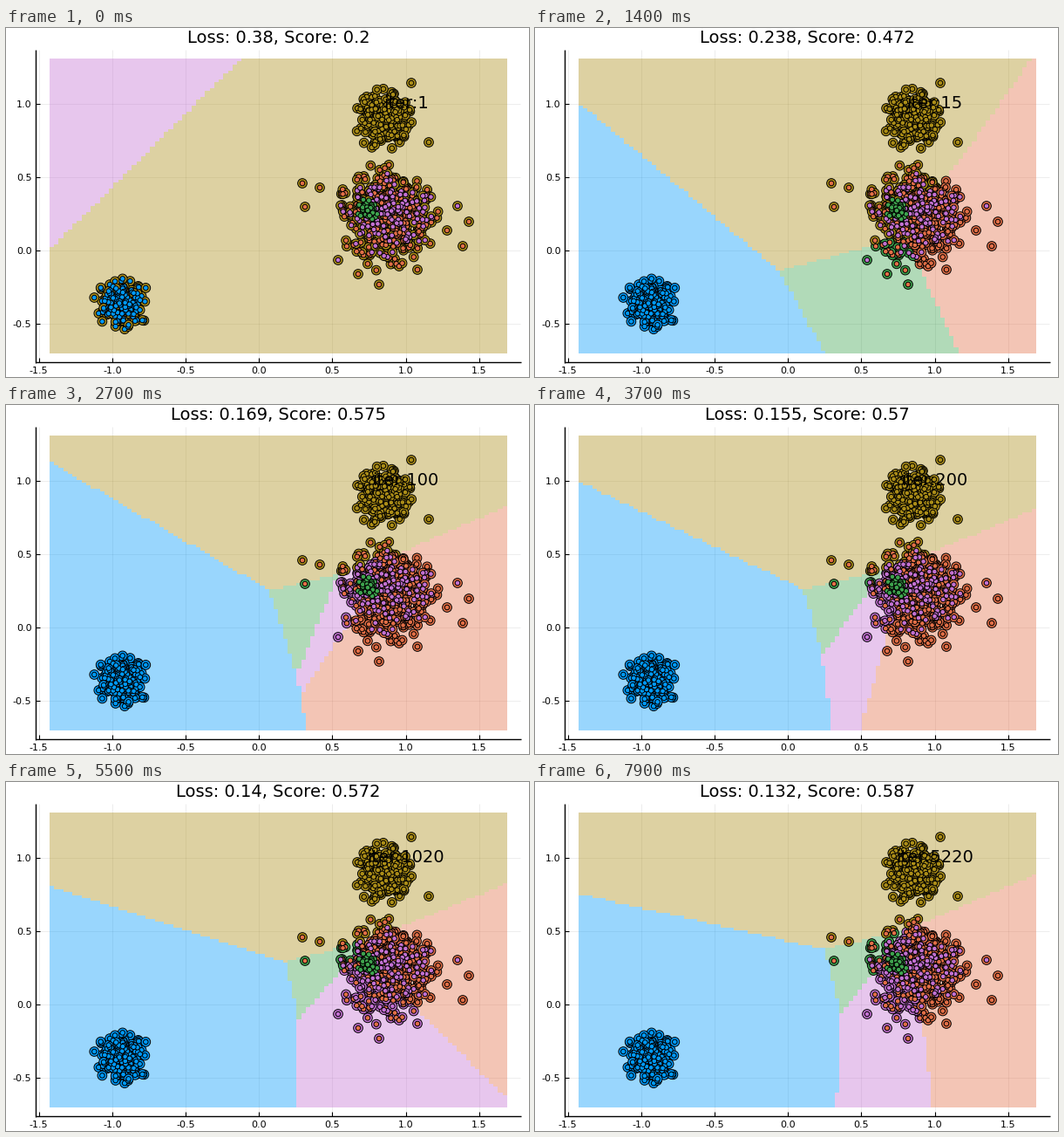
A matplotlib script for the animation above (8 s loop, 600 px wide and 400 px high).

```python
import numpy as np
import matplotlib.pyplot as plt
from matplotlib.animation import FuncAnimation

FRAMES, INTERVAL = 80, 100
plt.rcParams["font.family"] = "DejaVu Sans"

BLUE, ORANGE, GREEN, PURPLE, GOLD = range(5)
PALETTE = np.array([(0, 154, 250), (227, 111, 71), (62, 164, 78),
                    (195, 113, 210), (172, 142, 24)]) / 255
LEFT, RIGHT, TOP, BOTTOM = 50, 575, 35, 373
ORIGIN = np.array([290.2, 255])
UNIT = np.array([168.4, -168.2])
GRID = 100

# Linear classifier at a few stages of training: (bias, x, y) for
# blue, orange, green and purple; gold always scores zero.
STAGES = [0, 8, 14, 27, 46, 64, 79]
WEIGHTS = np.array([
    [(-3, -1.2, -1), (-2.5, 1.2, -.25), (-1.2, .26, -.93), (-1.43, -1, 1)],
    [(-1.293, -2.37, -3), (-1.638, 1.4, -.255), (-.784, .263, -.93), (-.895, -.281, 1)],
    [(-.378, -1.68, -2), (-.654, .888, -.628), (-.112, .244, -.926), (-.4, .5, -.8)],
    [(.354, -.701, -1.2), (.09, .459, -1.047), (.214, .216, -.91), (.175, .316, -.951)],
    [(.326, -.371, -1), (.1124, .3847, -.96), (.1985, .2107, -.867), (.148, .351, -1)],
    [(.371, -.273, -1), (.1427, .4287, -1.0155), (.2284, .227, -.873), (.165, .407, -1.031)],
    [(.432, -.226, -1), (.1715, .433, -1.023), (.28, .217, -.894), (.2075, .393, -1.028)],
])
LOSS = [0.38, 0.263, 0.238, 0.169, 0.143, 0.136, 0.132]
SCORE = [0.2, 0.405, 0.472, 0.575, 0.566, 0.578, 0.587]


def weights_at(step):
    hi = max(1, int(np.searchsorted(STAGES, step)))
    start, end = STAGES[hi - 1], STAGES[hi]
    mix = (step - start) / (end - start)
    return (1 - mix) * WEIGHTS[hi - 1] + mix * WEIGHTS[hi]


def classify(pixels, step):
    xy = (pixels - ORIGIN) / UNIT
    features = np.column_stack([np.ones(len(xy)), xy])
    scores = features @ weights_at(step).T
    return np.column_stack([scores, np.zeros(len(xy))]).argmax(axis=1)


def iteration(step):
    if step < 20:
        return step + 1
    if step < 40:
        return 20 + 10 * (step - 19)
    if step < 60:
        return 220 + 50 * (step - 39)
    return 1220 + 200 * (step - 59)


def stat(values, step):
    return f"{np.interp(step, STAGES, values):.3f}".rstrip("0")


rng = np.random.default_rng(7)


def cluster(count, center, spread, reach=2.2, strays=()):
    offsets = rng.normal(size=(count * 2, 2))
    offsets = offsets[np.hypot(*offsets.T) < reach][:count]
    points = np.array(center) + offsets * spread
    return np.vstack([points, np.reshape(strays, (-1, 2))])


samples = {
    BLUE: cluster(180, (134, 316), (13, 13), 2.6),
    ORANGE: cluster(270, (437, 217), (29, 30), 2.1, strays=[
        (340, 178), (360, 183), (343, 205), (531, 222), (524, 250),
        (506, 232), (428, 294), (404, 282), (472, 277)]),
    PURPLE: cluster(140, (435, 213), (25, 22), 2.3, strays=[(518, 204), (381, 266)]),
    GREEN: cluster(60, (414, 209), (6, 6)),
    GOLD: cluster(160, (433, 106), (16, 18), 2.1, strays=[(465, 63), (485, 131)]),
}
points = np.vstack(list(samples.values()))
truth = np.repeat(list(samples), [len(p) for p in samples.values()])

centers = (np.arange(GRID) + 0.5) / GRID
cells = np.stack(np.meshgrid(LEFT + centers * (RIGHT - LEFT),
                             TOP + centers * (BOTTOM - TOP)), -1).reshape(-1, 2)

fig = plt.figure(figsize=(6, 4), dpi=100, facecolor="white")
ax = fig.add_axes([0, 0, 1, 1])
ax.axis("off")
regions = ax.imshow(np.ones((GRID, GRID, 3)), extent=(LEFT, RIGHT, BOTTOM, TOP),
                    interpolation="nearest", alpha=0.4, aspect="auto", zorder=2)
ax.set(xlim=(0, 600), ylim=(400, 0))


def line(xs, ys, **style):
    ax.plot(xs, ys, color="black", solid_capstyle="butt", **style)


def label(x, y, text="", size=14, ha="center"):
    return ax.text(x, y, text, fontsize=size, ha=ha, va="baseline", zorder=6)


for value in np.arange(-1.5, 1.6, 0.5):
    x = ORIGIN[0] + UNIT[0] * value
    line([x, x], [25, 383], lw=0.5, alpha=0.1, zorder=1)
    line([x, x], [378, 383], lw=0.8, zorder=3)
    label(x, 396.5, f"{value:.1f}", size=8)
for value in np.arange(-0.5, 1.1, 0.5):
    y = ORIGIN[1] + UNIT[1] * value
    line([34, 590], [y, y], lw=0.5, alpha=0.1, zorder=1)
    line([34, 39], [y, y], lw=0.8, zorder=3)
    label(29.5, y + 4, f"{value:.1f}", size=8, ha="right")
line([34, 34], [24.5, 383.5], lw=1, zorder=3)
line([33.5, 590.5], [383, 383], lw=1, zorder=3)

marker = dict(c=PALETTE[truth], edgecolors="black", linewidths=0.7)
rings = ax.scatter(*points.T, s=7.7 ** 2, zorder=4, **marker)
ax.scatter(*points.T, s=4.0 ** 2, zorder=5, **marker)

title = label(312.4, 17)
counter = label(458.6, 92)


def update(step):
    regions.set_data(PALETTE[classify(cells, step)].reshape(GRID, GRID, 3))
    rings.set_facecolor(PALETTE[classify(points, step)])
    title.set_text(f"Loss: {stat(LOSS, step)}, Score: {stat(SCORE, step)}")
    counter.set_text(f"iter:{iteration(step)}")
    return regions, rings, title, counter


animation = FuncAnimation(fig, update, frames=FRAMES, interval=INTERVAL,
                          repeat=True, repeat_delay=0)
plt.show()
```
